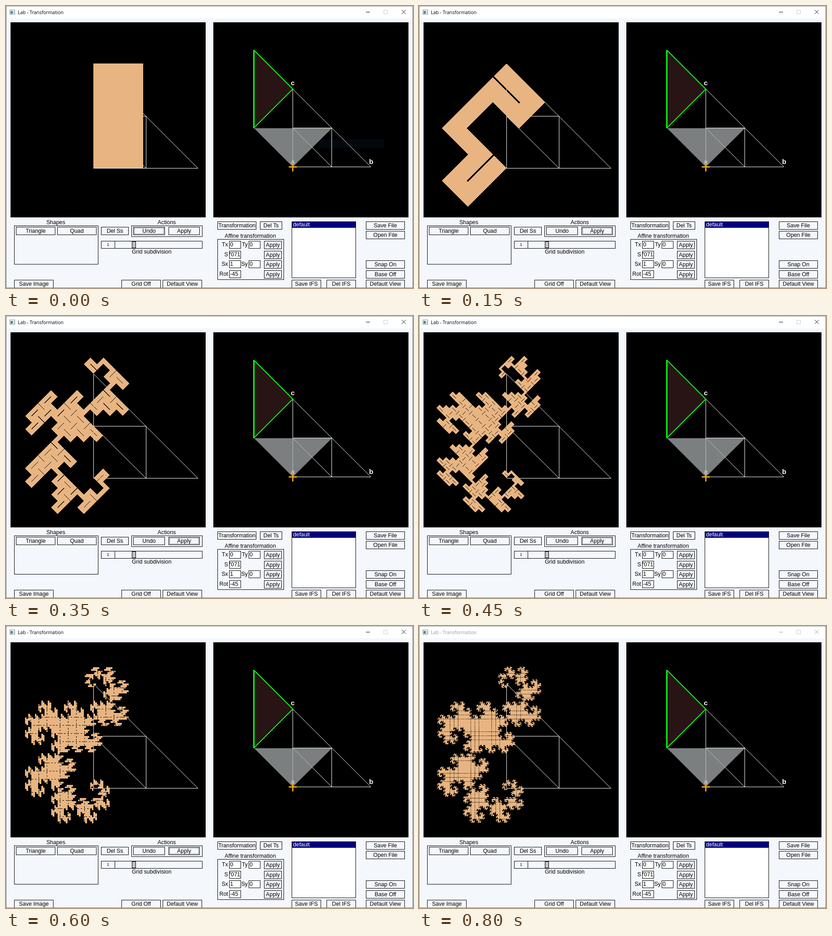
An HTML page with a canvas that plays this animation: 899 px wide and 623 px high, repeating every 850 ms.

```html
<!DOCTYPE html>
<html lang="en">
<head>
<meta charset="utf-8">
<title>Lab - Transformation</title>
<style>
html, body { margin: 0; width: 100%; height: 100%; overflow: hidden; background: #f4f7fc; }
#win { position: absolute; left: 0; top: 0; width: 899px; height: 623px; overflow: hidden; background: #f4f7fc;
  font: 12.3px "Liberation Sans", Arial, sans-serif; color: #000; }
#win > * { position: absolute; box-sizing: border-box; white-space: pre; }
#bar { left: 0; top: 0; width: 899px; height: 27px; background: #fff; }
#title { left: 26px; top: 5px; font: 10.4px/18px "Open Sans", "Noto Sans", sans-serif; }
#edge { inset: 0; border: 1px solid #777; border-top-color: #999; }
.box { border: 1px solid #000; }
.btn { border: 1px solid #000; text-align: center; line-height: 16px; }
.field { border: 1px solid #000; background: #fff; line-height: 15px; padding-left: 1px; overflow: hidden; }
.focus { box-shadow: inset 0 0 0 1px #f4f7fc; }
.focus::after { content: ""; position: absolute; inset: 1px; border: 1px dotted #000; }
.label { line-height: 16px; }
.mid { transform: translateX(-50%); }
.end { transform: translateX(-100%); }
.blur #title { color: #999; }
.blur #ctl { stroke: #999; }
</style>
</head>
<body>
<div id="win">
  <div id="bar"></div>
  <div id="title">Lab - Transformation</div>
  <svg id="frame" width="899" height="27" fill="none" shape-rendering="crispEdges">
    <path d="M8.500 8.500h11v10h-11z" fill="#f4f6f6" stroke="#8b9398"/>
    <path d="M10 11h5v6h-5z" fill="#3d8f8c"/>
    <path d="M16 11h3v6h-3z" fill="#cfd6da"/>
    <path d="M834.500 9.500h8v8h-8z" stroke="#ccc"/>
    <g id="ctl" stroke="#111"><path d="M795 13.500h9"/><path d="M874 8.500l9 9m0-9l-9 9" shape-rendering="auto"/></g>
  </svg>
  <canvas id="plot" width="431" height="431" style="left:10px;top:36px"></canvas>
  <svg id="view" width="431" height="431" viewBox="458 36 431 431" style="left:458px;top:36px;background:#000" fill="none">
    <g font-family="Liberation Sans, Arial, sans-serif" font-size="15" font-weight="bold" fill="#fff" text-anchor="middle">
      <text x="633.500" y="349">a</text><text x="806.500" y="348.500">b</text><text x="633.500" y="175">c</text>
    </g>
    <path stroke="#fff" d="M633.500 183.500V355.500H806L633.500 183.500M633.500 269.500H719.500V355.500L633.500 269.500"/>
    <path fill="#a6acac" fill-opacity=".74" d="M548 270H720L633.500 355.500z"/>
    <path fill="#281414" stroke="#0f1" stroke-width="2" stroke-linejoin="bevel" d="M547.500 97.500L633.500 183.500L547.500 269.500z"/>
    <path stroke="#0f1" stroke-width="3" d="M547.500 97V270"/>
    <path stroke="#e9a21c" stroke-width="3" d="M624.500 355.500h18M633.500 346.500v19"/>
    <path id="hint" fill="#04080c" d="M690 295h145v18h-145z" style="mix-blend-mode:lighten"/>
  </svg>
</div>
<script>
const win = document.getElementById('win');

function add(cls, x, y, w, h, text = '') {
  const el = document.createElement('div');
  el.className = cls;
  el.style.cssText = `left:${x}px;top:${y}px;` + (w ? `width:${w}px;height:${h}px` : '');
  el.textContent = text;
  win.append(el);
  return el;
}
const box = (x, y, w, h) => add('box', x, y, w, h);
const btn = (x, y, w, text) => add('btn', x, y, w, 18, text);
const field = (x, y, text) => add('field', x, y, 26, 17, text);
const label = (x, y, text, align = '') => add('label ' + align, x, y, 0, 0, text);

label(110, 470, 'Shapes', 'mid');
box(18, 485, 186, 86);
btn(22, 488, 87, 'Triangle');
btn(113, 488, 87, 'Quad');
btn(210, 488, 61, 'Del Ss');
label(355, 470, 'Actions', 'mid');
box(277, 485, 157, 25);
const undo = btn(281, 488, 70, 'Undo');
const apply = btn(359, 488, 69, 'Apply');
box(210, 519, 224, 17);
add('btn', 210, 519, 31, 17, '1').style.font = '9px/15px "Liberation Sans", sans-serif';
box(278, 520, 9, 15).style.background = '#c0c0c0';
label(278, 535, 'Grid subdivision');
btn(18, 605, 87, 'Save Image');
btn(255, 605, 87, 'Grid Off');
btn(346, 605, 87, 'Default View');

btn(467, 476, 86, 'Transformation');
btn(561, 476, 49, 'Del Ts');
label(483, 500, 'Affine transformation');
box(467, 515, 147, 90);
[['Tx', '0', 'Ty', '0'], ['S', '7071'], ['Sx', '1', 'Sy', '0'], ['Rot', '-45']].forEach(([k, v, k2, v2], i) => {
  const y = Math.round(519 + i * 21.6);
  label(490.5, y, k, 'end');
  const f = field(493, y, v);
  if (v.length > 3) f.style.textIndent = '-5px';
  if (k2) {
    label(534, y, k2, 'end');
    field(536, y, v2);
  }
  btn(570, y, 39, 'Apply');
});
box(631, 476, 142, 125).style.background = '#fff';
const row = add('label', 632, 477, 140, 13, 'default');
row.style.cssText += 'background:#000080;color:#fff;padding-left:2px;line-height:13px';
btn(631, 605, 65, 'Save IFS');
btn(708, 605, 65, 'Del IFS');
[['Save File', 476], ['Open File', 497], ['Snap On', 562], ['Base Off', 584], ['Default View', 605]]
  .forEach(([text, y]) => btn(795, y, 86, text));
add('', 0, 0).id = 'edge';

// Dragon curve: two similarities applied again and again to one quad.
const SIZE = 431, UNIT = 230.9, AX = 183.4, AY = 322.4, WIDE = 0.4763;
const STEP = 50, STEPS = 17, PICK_LEVEL = 9, PICK = [232, 105];
const ctx = document.getElementById('plot').getContext('2d');

// Each cell is [x, y, dx, dy]: corner and direction of its short side.
const grow = cells => cells.flatMap(([x, y, p, q]) => [
  [(x - y) / 2, (x + y) / 2, (p - q) / 2, (p + q) / 2],
  [(-x - y) / 2, 1 + (x - y) / 2, (-p - q) / 2, (p - q) / 2]
]);

const corners = ([x, y, p, q]) => [[0, 0], [WIDE, 0], [WIDE, 1], [0, 1]]
  .map(([s, t]) => [AX + UNIT * (x + s * p - t * q), AY - UNIT * (y + s * q + t * p)]);

function holds([x, y, p, q], px, py) {
  const u = (px - AX) / UNIT - x, v = (AY - py) / UNIT - y, d = p * p + q * q;
  const s = (u * p + v * q) / d, t = (v * p - u * q) / d;
  return s >= 0 && s < WIDE && t >= 0 && t < 1;
}

// Hard-edged fill: a pixel is set when its centre lies in a cell.
function raster(cells) {
  const layer = document.createElement('canvas');
  layer.width = layer.height = SIZE;
  const c = layer.getContext('2d'), img = c.createImageData(SIZE, SIZE);
  const px = new Uint32Array(img.data.buffer);
  for (const cell of cells) {
    const pts = corners(cell), xs = pts.map(p => p[0]), ys = pts.map(p => p[1]);
    const x1 = Math.max(...xs), y1 = Math.max(...ys);
    for (let y = Math.floor(Math.min(...ys)); y <= y1; y++)
      for (let x = Math.floor(Math.min(...xs)); x <= x1; x++)
        if (holds(cell, x + 0.5, y + 0.5)) px[y * SIZE + x] = 0xff82b5e8;
  }
  c.putImageData(img, 0, 0);
  return layer;
}

const layers = [];
let picked;
for (let n = 0, cells = [[0, 0, 1, 0]]; n < STEPS; n++, cells = grow(cells)) {
  layers.push(raster(cells));
  if (n === PICK_LEVEL) picked = cells.find(c => holds(c, ...PICK));
}

function line(color, pts) {
  ctx.strokeStyle = color;
  ctx.beginPath();
  pts.forEach(p => ctx.lineTo(...p));
  ctx.stroke();
}

function draw(n) {
  ctx.fillStyle = '#000';
  ctx.fillRect(0, 0, SIZE, SIZE);
  line('#fff', [[183.5, 92], [183.5, 322.5], [414, 322.5], [183.5, 92]]);
  line('#fff', [[183.5, 207.5], [299.5, 207.5], [299.5, 322.5], [183.5, 207.5]]);
  ctx.drawImage(layers[n], 0, 0);
  if (n === PICK_LEVEL && picked) {
    const pts = corners(picked);
    line('#d81e05', [...pts, pts[0]]);
  }
  const last = n === STEPS - 1;
  undo.classList.toggle('focus', n === 0);
  apply.classList.toggle('focus', n > 0 && !last);
  win.classList.toggle('blur', last);
  document.getElementById('hint').style.display = n ? 'none' : '';
}

let shown = -1;
function tick() {
  const n = Math.floor(performance.now() / STEP) % STEPS;
  if (n !== shown) draw(shown = n);
  requestAnimationFrame(tick);
}
tick();
</script>
</body>
</html>
```
